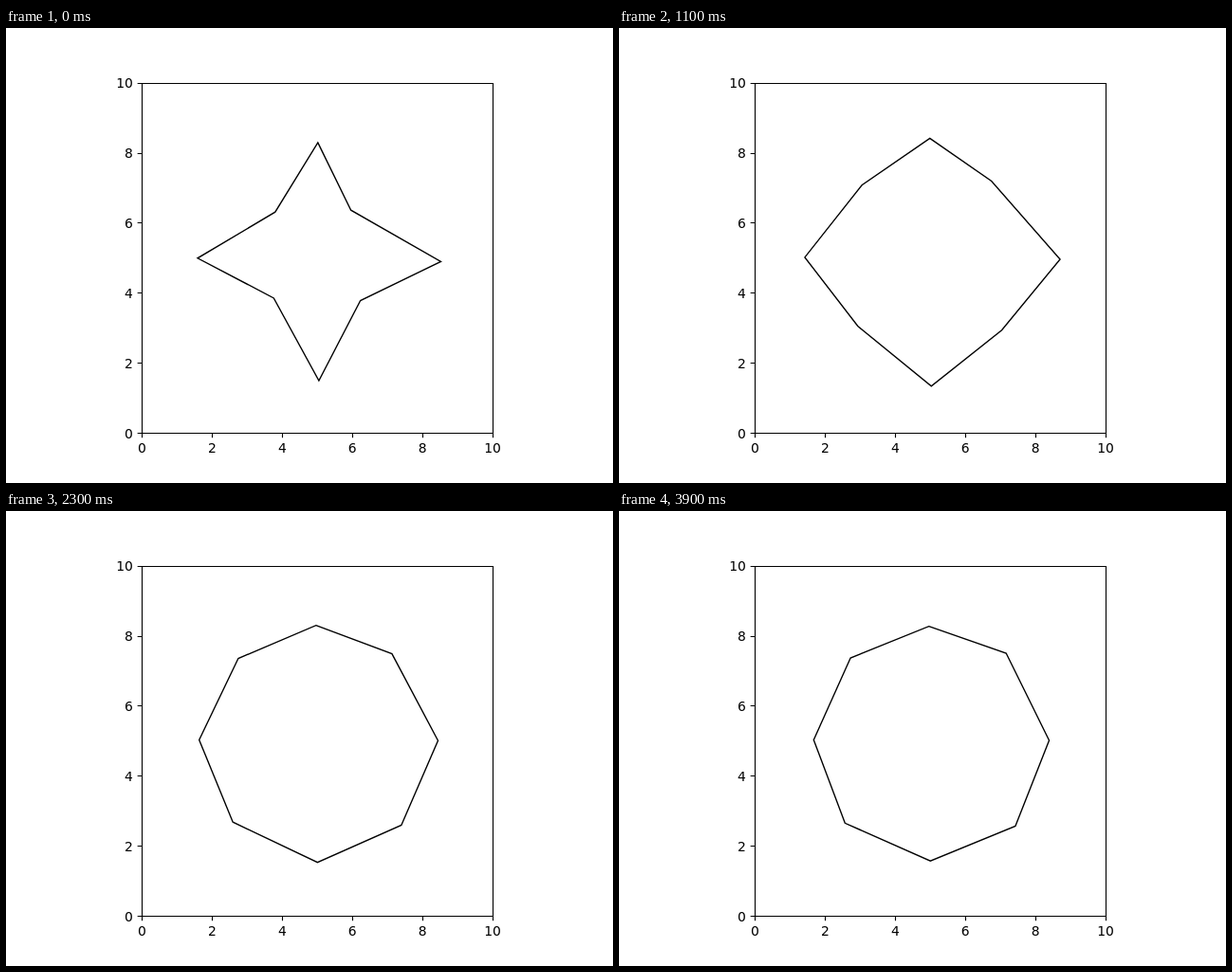
An HTML page that plays this animation: 640x480 px, repeating every 4000 ms.

```html
<!DOCTYPE html>
<html lang="en">
<head>
<meta charset="utf-8">
<title>Relaxing polygon</title>
<style>
  html, body { margin: 0; width: 100%; height: 100%; overflow: hidden; background: #fff; }
  svg { display: block; width: 640px; height: 480px; }
  text { font: 13.89px "DejaVu Sans", sans-serif; }
</style>
</head>
<body>
<svg viewBox="0 0 640 480">
  <g id="axes" fill="none" stroke="#000" stroke-width="1.11"></g>
  <g id="labels"></g>
  <path id="shape" fill="none" stroke="#000" stroke-width="1.39" stroke-linejoin="miter" stroke-miterlimit="10"/>
</svg>
<script>
const LOOP = 4000, STEP = 100;
const LEFT = 143.2, BOTTOM = 427.2, UNIT = 36.96;
const $ = id => document.getElementById(id);

function add(parent, tag, attrs, text = '') {
  const el = document.createElementNS('http://www.w3.org/2000/svg', tag);
  for (const k in attrs) el.setAttribute(k, attrs[k]);
  el.textContent = text;
  parent.appendChild(el);
}

const px = n => LEFT + n * UNIT;
const py = n => BOTTOM - n * UNIT;
const snap = v => Math.round(v) + 0.5;

function drawAxes() {
  const x0 = snap(px(0)), x1 = snap(px(10));
  const y0 = snap(py(0)), y1 = snap(py(10));
  let d = `M${x0} ${y0}H${x1}V${y1}H${x0}Z`;
  for (let n = 0; n <= 10; n += 2) {
    d += `M${snap(px(n))} ${y0}v4.86M${x0} ${snap(py(n))}h-4.86`;
    add($('labels'), 'text', { x: px(n) + 0.3, y: 448, 'text-anchor': 'middle' }, n);
    add($('labels'), 'text', { x: 133.8, y: Math.round(py(n) + 5.4), 'text-anchor': 'end' }, n);
  }
  add($('axes'), 'path', { d });
}

// Corners clockwise from the top: where each starts, where it settles,
// and how far it swings off the straight way between.
const corners = [
  { from: [328.8, 120.9], to: [326.7, 121.7], swing: [0.4, -5.3] },
  { from: [363.7, 192.2], to: [408.2, 150], swing: [-1.5, -1.8] },
  { from: [458.5, 246.4], to: [453.5, 242], swing: [10.3, 0.6] },
  { from: [373.7, 287.5], to: [417.9, 332.4], swing: [-0.4, 0.5] },
  { from: [329.9, 372], to: [328.3, 369.1], swing: [0.5, 8.1] },
  { from: [282.3, 284.9], to: [238.3, 329.3], swing: [-0.4, -0.8] },
  { from: [202, 242.8], to: [205.3, 241.4], swing: [-8.6, 0.1] },
  { from: [283.8, 194.2], to: [244.1, 155], swing: [-0.5, -1.7] }
];

function draw(ms) {
  const t = Math.floor((ms % LOOP) / STEP) * STEP / 1000;
  const left = Math.exp(-t * (1 + t) / 2);
  const bulge = Math.sin(Math.PI * left ** 0.75);
  const pts = corners.map(({ from, to, swing }) =>
    to.map((end, k) => (end + (from[k] - end) * left + swing[k] * bulge).toFixed(2)));
  $('shape').setAttribute('d', 'M' + pts.join(' ') + 'Z');
}

drawAxes();
draw(0);
const start = performance.now();
function tick() {
  draw(performance.now() - start);
  requestAnimationFrame(tick);
}
requestAnimationFrame(tick);
</script>
</body>
</html>
```
